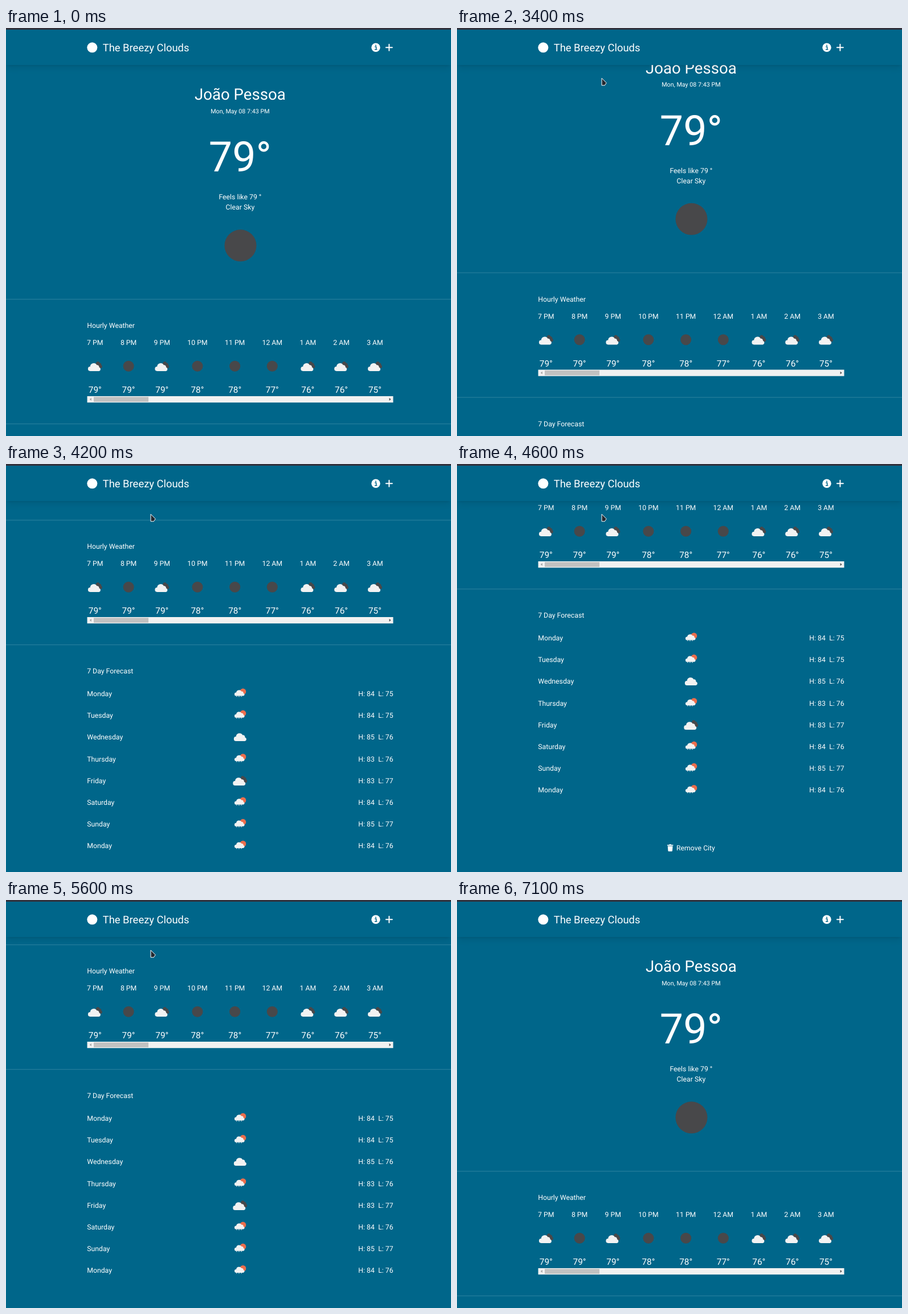
Recreate the animation shown at these times as an HTML page. Size 781 px wide and 717 px high, loop 7700 ms.

```html
<!DOCTYPE html>
<html lang="en">
<head>
<meta charset="utf-8">
<title>Weather</title>
<style>
  html, body { margin: 0; width: 100%; height: 100%; overflow: hidden; background: #00668a; }
  svg { position: absolute; left: 0; top: 0; width: 781px; height: 717px; }
  text { font-family: Roboto, Arial, sans-serif; fill: #fff; white-space: pre; text-rendering: geometricPrecision; }
  header {
    position: absolute; left: 0; top: 0; width: 781px; height: 65px; box-sizing: border-box;
    background: #00668a; border-top: 3.5px solid #31313d;
    box-shadow: 0 7.7px 11.5px -2.3px #0000001a, 0 3px 4.6px -3px #0000001a;
  }
</style>
</head>
<body>
<svg viewBox="0 0 781 717">
  <defs>
    <path id="cloud" d="M4 0a4 4 0 0 1-.3-8a6.2 6.2 0 0 1 11.6-2.6a3.6 3.6 0 0 1 4.2 4a3.4 3.4 0 0 1-.3 6.6z"/>
    <circle id="clear" r="9.5" fill="#48484a"/>
    <use id="overcast" href="#cloud" x="-10.7" y="7" fill="#f2f2f2"/>
    <g id="broken">
      <use href="#cloud" transform="translate(-1.3 3.5) scale(.63 .85)" fill="#48484a"/>
      <use href="#cloud" x="-12.3" y="8.6" fill="#f2f2f2"/>
    </g>
    <g id="rain">
      <circle cx="5.2" cy="-3.6" r="5.4" fill="#ec6e4c"/>
      <use href="#cloud" transform="translate(-9.6 4) scale(.8 .75)" fill="#f2f2f2"/>
      <path d="M-5.5 4l-.5 1.4M-1.5 4l-.5 1.6M2.5 4l-.5 1.4" stroke="#f2f2f2" stroke-width="1.3"/>
    </g>
  </defs>
  <g id="page"></g>
</svg>
<header></header>
<svg viewBox="0 0 781 717">
  <circle cx="151.3" cy="34.3" r="9" fill="#fff"/>
  <text x="169.7" y="40.6" font-size="18.4">The Breezy Clouds</text>
  <circle cx="649" cy="34.2" r="7.7" fill="#fff"/>
  <path d="M647.2 33.1h2.5v4.4M647 37.8h4.3" fill="none" stroke="#00668a" stroke-width="1.5"/>
  <circle cx="649" cy="30.5" r="1.1" fill="#00668a"/>
  <path d="M672.4 28.8v11M666.9 34.3h11" stroke="#fff" stroke-width="2" stroke-linecap="round"/>
  <g id="cursor" fill="#232931" stroke="#fff" stroke-linejoin="round">
    <path id="arrow" d="M0 0V12.6H5.4L8.2 8.2Z"/>
    <path id="hand" d="M0 .8Q1.1-.5 2.2.8V4.2L7 5.4V8.2L5.9 10H1.3L-1.8 6.2L-.9 5.2L0 5.8Z"/>
  </g>
</svg>
<script>
const $ = id => document.getElementById(id);
const MID = 410.9, LEFT = 142.2, RIGHT = 679.6;

const text = (str, x, y, size = 12.28, anchor = 'middle') =>
  `<text x="${x}" y="${y}" font-size="${size}" text-anchor="${anchor}">${str}</text>`;
const icon = (name, x, y) => `<use href="#${name}" x="${x}" y="${y}"/>`;
const rect = (x, y, w, h, fill) => `<rect x="${x}" y="${y}" width="${w}" height="${h}" fill="${fill}"/>`;
const rule = y => rect(0, y, 781, 1.3, '#ffffff24');

const hours = [
  ['7 PM', 156.3, 'broken', 79], ['8 PM', 215.1, 'clear', 79], ['9 PM', 273.8, 'broken', 79],
  ['10 PM', 336, 'clear', 78], ['11 PM', 401.7, 'clear', 78], ['12 AM', 467.3, 'clear', 77],
  ['1 AM', 529.8, 'broken', 76], ['2 AM', 588.6, 'broken', 76], ['3 AM', 647.5, 'broken', 75]
];
const days = [
  ['Monday', 'rain', 84, 75], ['Tuesday', 'rain', 84, 75], ['Wednesday', 'overcast', 85, 76],
  ['Thursday', 'rain', 83, 76], ['Friday', 'broken', 83, 77], ['Saturday', 'rain', 84, 76],
  ['Sunday', 'rain', 85, 77], ['Monday', 'rain', 84, 76]
];

$('page').innerHTML =
  text('João Pessoa', MID, 126, 27.6) +
  text('Mon, May 08 7:43 PM', MID, 149.8, 10.74) +
  text('79°', MID, 252.4, 73.6) +
  text('Feels like 79 °', MID, 301) +
  text('Clear Sky', MID, 319.2) +
  '<circle cx="411.5" cy="382.3" r="28" fill="#48484a"/>' +
  rule(476) +
  text('Hourly Weather', LEFT, 527, 12.28, 'start') +
  hours.map(([label, x, kind, temp]) =>
    text(label, x, 557.4) + icon(kind, x, 594.3) + text(temp + '°', x, 641.2, 15.35)).join('') +
  rect(142.5, 647, 537, 11.2, '#f1f1f1') +
  rect(154, 648.3, 96, 8.6, '#c1c1c1') +
  '<path d="M149.8 650v5l-3-2.5z" fill="#a3a3a3"/><path d="M672.6 650v5l3-2.5z" fill="#505050"/>' +
  rule(695) +
  text('7 Day Forecast', LEFT, 746, 12.28, 'start') +
  days.map(([day, kind, high, low], i) => {
    const y = 781.6 + 38.2 * i;
    return text(day, LEFT, y + 4.4, 12.28, 'start') + icon(kind, MID - .2, y) +
      text('H: ' + high, 646.8, y + 4.4, 12.28, 'end') + text('L: ' + low, RIGHT, y + 4.4, 12.28, 'end');
  }).join('') +
  '<path d="M369 1145.2h3l.8-1h2.8l.8 1h3v1.6H369zM369.8 1147.6h8.8l-.6 8q-.1 1.2-1.3 1.2h-5q-1.2 0-1.3-1.2z" fill="#fff"/>' +
  text('Remove City', 385, 1155, 12.28, 'start');

// Keys: [time, ...values], linear in between
const scroll = [
  [3300, 0], [3400, 46.5], [3600, 140], [3900, 247], [4200, 378], [4400, 445], [4500, 466], [4600, 476],
  [5200, 476], [5300, 465], [5400, 449], [5600, 398], [5800, 317], [6000, 164], [6100, 90], [6200, 28], [6300, 0]
];
const pointer = [
  [2000, 190.2, 36.5], [2100, 228, 66], [2200, 254, 88.2], [6800, 254, 88.2], [6900, 178, 50], [7000, 88, .5]
];

function at(keys, t) {
  const i = keys.findIndex(k => k[0] > t);
  if (i < 1) return keys[i ? keys.length - 1 : 0].slice(1);
  const a = keys[i - 1], b = keys[i], p = (t - a[0]) / (b[0] - a[0]);
  return a.slice(1).map((v, j) => v + (b[j + 1] - v) * p);
}

function draw(now) {
  const t = Math.floor(now % 7700 / 100) * 100;
  $('page').setAttribute('transform', `translate(0 ${-at(scroll, t)[0]})`);
  $('cursor').setAttribute('transform', `translate(${at(pointer, t).join(' ')})`);
  $('cursor').style.display = t >= 2000 && t < 7100 ? '' : 'none';
  $('hand').style.display = t < 2100 ? '' : 'none';
  $('arrow').style.display = t < 2100 ? 'none' : '';
}

const start = performance.now();
function loop() {
  draw(performance.now() - start);
  requestAnimationFrame(loop);
}
loop();
</script>
</body>
</html>
```
